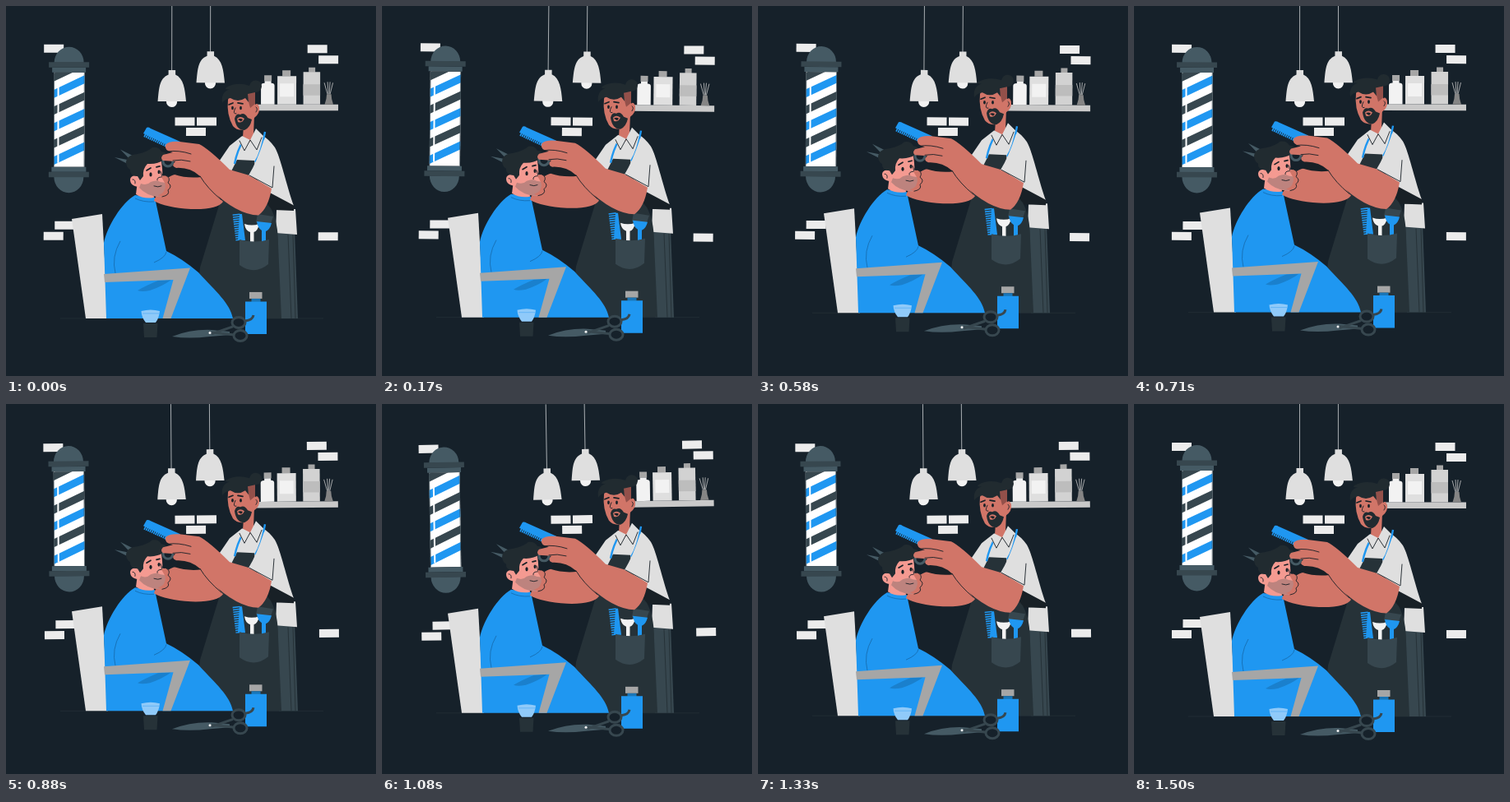
These frames come from a looping animation (450 px wide and 450 px high, 1540 ms). An HTML page:

```html
<!DOCTYPE html>
<html lang="en">
<head>
<meta charset="utf-8">
<title>Barber shop</title>
<style>
  html, body { margin: 0; width: 100%; height: 100%; overflow: hidden; background: #16212a; }
  svg { display: block; width: 100vw; height: 100vh; }
  .blue { fill: #1f97f1; }
  .skin { fill: #d17568; }
  .pink { fill: #f49a91; }
  .dark { fill: #263238; }
  .slate { fill: #37474f; }
  .steel { fill: #455a64; }
  .hair { fill: #212b30; }
  .ink { fill: #182026; }
  .light { fill: #dfdfdf; }
  .pale { fill: #f2f2f2; }
  .grey { fill: #a6a6a6; }
  .line { fill: none; stroke: #182026; stroke-width: .9; stroke-linecap: round; stroke-linejoin: round; }
  .brow { stroke-width: 1.7; }
  .fold { fill: none; stroke: #1669aa; stroke-width: .8; }
</style>
</head>
<body>
<svg viewBox="0 0 450 450">
  <defs>
    <g id="lamp">
      <path d="M201.500 0V79" stroke="#b9bdc0" stroke-width=".9"/>
      <circle class="pale" cx="201.500" cy="116.500" r="6.600"/>
      <path class="light" d="M197.500 78h8.500v5.500C216 88 217.500 101 219 116H184.500C186 101 186 88 197.500 83.500Z"/>
    </g>
    <clipPath id="tube"><path d="M58 81H95.500V196H58Z"/></clipPath>
  </defs>

  <g id="room">
    <g id="bricks" fill="#ececec"></g>
    <use href="#lamp"/>
    <use href="#lamp" x="46.900" y="-22.700"/>

    <!-- barber pole -->
    <path class="steel" d="M58.500 69a18 19 0 0 1 36 0ZM58.500 208a18 19.500 0 0 0 36 0ZM56 75H97v6H56ZM55.500 196H97.500v6H55.500Z"/>
    <path class="slate" d="M52 68.500h49v6.500H52ZM52 202h49v6.500H52Z"/>
    <g clip-path="url(#tube)">
      <path fill="#fff" d="M58 81H96V196H58Z"/>
      <g id="stripes"></g>
      <path d="M58.400 81V196M95.200 81V196" stroke="#37474f" stroke-width=".8"/>
      <path d="M63.500 97V191" stroke="#fff" stroke-width="2"/>
    </g>

    <!-- shelf -->
    <path fill="#c9c9c9" d="M304 119.500H404V127H304Z"/>
    <path class="grey" d="M314 84h9v7h-9ZM336 78h10v7h-10ZM368 74.500h8v6h-8Z"/>
    <path class="pale" d="M314.500 91h8v2.500q4 0 4 3V119.500H310V96.500q0-3 4.500-3Z"/>
    <path class="light" d="M330 85h23v34.500h-23Z"/>
    <path class="pale" d="M333 94h17v16h-17Z"/>
    <path fill="#d2d2d2" d="M361.500 80H382v39.500h-20.500Z"/>
    <path fill="#bdbdbd" d="M361.500 95H382v13.500h-20.500Z"/>
    <path d="M391 107L387 93M392 107L391 92M393 107L394 92M394 107L397.500 93" stroke="#c9c9c9" stroke-width=".8"/>
    <path fill="#858585" d="M390 107h5.500q0 6 2.500 12.500H387.500Q390 113 390 107Z"/>
  </g>

  <g id="people">
    <path d="M66 380H386" stroke="#263238" stroke-width=".7"/>

    <!-- barber: body -->
    <path class="slate" d="M328 270L351 272L355 380H332Z"/>
    <path d="M343 278L347 380M349 278L352 380" stroke="#263238" stroke-width="1"/>
    <path class="light" d="M286 159L272 170L257 192L270 204L300 240L350 243C341 218 334 184 327 172Q320 162 311 157ZM329 248L352 247L354 278L328 276Z"/>
    <path class="ink" d="M319 226L350 242.500V249L326 248L312 250Z"/>
    <path class="dark" d="M281 187L302 188Q306 230 322 246Q331 262 331 290L335 380H230L236 318L261 236L272 205Z"/>
    <path d="M278 192Q281 176 289 163M303 190Q311 178 315 153" fill="none" stroke="#1f97f1" stroke-width="2.400"/>

    <!-- barber: apron pocket -->
    <path class="slate" d="M306 253L325 256L322 265L304 263Z"/>
    <path class="blue" d="M284 253L287 253L291 285H282Z"/>
    <path d="M280 253L284 285" stroke="#1f97f1" stroke-width="9" stroke-dasharray="1.600 1.200"/>
    <path class="pale" d="M290 265Q299 268 308 265Q306 274 301.500 275V287H297V275Q291 273 290 265Z"/>
    <path class="blue" d="M305 262L323 264Q321 272 316 274V287H311V273Q306 270 305 262Z"/>
    <path class="slate" d="M284 284Q302 289 320 284L319 314Q302 328 284 315Z"/>

    <!-- barber: head -->
    <path class="skin" d="M289 145L302 132L301 157L296 166L288 160Z"/>
    <path class="skin" d="M270 114Q268 132 276 146Q282 153 292 150L302 136Q309 131 308 123Q306 117 303 120L300 104H274Z"/>
    <path fill="#93504a" d="M292 105L303 104L303 119L297 124Z"/>
    <path class="hair" d="M263 118Q261 105 272 101Q265 102 268 99Q281 92 296 97Q298 90 304 90.500Q311 91 311 98Q310 105 303 105L294 107L295 117L291 112Q282 118 273 112Q266 113 263 118Z"/>
    <path class="hair" d="M278 137Q280 130 285 132Q290 129 294 136L299 138Q297 148 290 151Q280 151 278 137Z"/>
    <path class="skin" d="M281 137Q285 133 290 137Q287 143 282 141Z"/>
    <path class="ink" d="M282 138Q285 136 288 138L286 140.500Z"/>
    <ellipse class="ink" cx="275.500" cy="124" rx="1.400" ry="2.300"/>
    <ellipse class="ink" cx="285.500" cy="124" rx="1.400" ry="2.300"/>
    <path class="line" d="M279 124Q275 132 280 131M304 123q3 2 0 6"/>
    <path class="line brow" d="M271 120L276 118M282 118L288 119"/>
    <path class="light" d="M287 158L283 164L290 177L297 163L305 175L313 158L304 149L297 163Z"/>
    <path class="line" d="M284 164L290 176L297 163L305 175L311 160"/>

    <!-- chair and cape -->
    <path class="light" d="M80 259L117 253L124 380H97Z"/>
    <path class="blue" d="M157 230C141 239 123 268 119 288L122 380H276C272 361 256 348 234 324Q214 307 195 298L181 233Z"/>
    <path fill="#1a80cd" d="M160 346Q170 340 185 334L201 333Q190 341 175 346Q165 348 160 346Z"/>
    <path class="fold" d="M195 299Q194 306 180 312M133 325Q128 305 139 286M157 234Q167 239 180 238"/>
    <path class="grey" d="M119 326L224 318.500L200.500 380H190.500L203.500 333L120 336Z"/>

    <!-- far arm -->
    <path class="skin" d="M194 212Q203 200 236 205L264 238Q257 248 225 247Q194 245 180 237Q181 230 192 226Z"/>
    <path class="ink" d="M204 193Q221 192 238 208Q220 210 205 205Q212 202 204 193Z"/>

    <!-- client -->
    <path class="steel" d="M132 184L158 189V195L150 193ZM139 174.500L160 185L152 188Z"/>
    <path class="pink" d="M160 213L158 229Q167 235 180 233L178 215Z"/>
    <path class="pink" d="M161 193L188 184Q191 200 190 206Q196 208 194 213L194 222Q196 231 188 232Q172 232 164 220Q151 220 151 211Q152 205 160 207Z"/>
    <path fill="#bd837e" d="M164 216Q171 219 176 214Q183 211 188 214L194 215V222Q196 232 186 232Q171 231 162 221Z"/>
    <path class="hair" d="M146 191Q146 181 160 180Q173 177 178 172Q186 171 189 177Q199 178 192 187Q184 193 172 192Q166 198 167 207L163 212L160 207Q150 206 151 199Q147 197 146 191Z"/>
    <ellipse class="ink" cx="176" cy="205" rx="1.600" ry="2.600"/>
    <ellipse class="ink" cx="186" cy="202" rx="1.500" ry="2.400"/>
    <path class="line brow" d="M171 200L176 197M183 196L187 195"/>
    <path class="line" d="M188 201L190 208Q183 208 184 212M180 219Q185 221 189 219M154 211q4 0 3 5"/>
    <path class="skin" d="M189 208Q195 204 199 210Q200 214 197 215Q202 219 197 224Q200 230 190 232L185 230Q192 228 193 223Q195 219 193 215Z"/>
    <path class="line" d="M194 206Q201 209 197 215Q203 219 197 224Q200 230 190 232"/>

    <!-- comb, held scissors and near arm -->
    <path class="blue" d="M171 148Q173 147 176 149L212 165L207 174L167 155Z"/>
    <path d="M169 155.500L207 173" stroke="#1f97f1" stroke-width="8" stroke-dasharray="1.700 .8"/>
    <circle cx="197" cy="189" r="6" fill="none" stroke="#455a64" stroke-width="3"/>
    <path class="skin" d="M194 169Q198 164 211 165L235 168Q247 174 272 199L296 206L323 222Q319 246 307 254.500Q281 254 249 223L236 207Q224 196 207 197Q200 194 206 189L191 188Q187 185 191 181L203 178Q192 176 194 169Z"/>
    <path class="line" d="M196 177Q210 175 225 180M203 188Q213 186 224 189M236 207Q245 222 262 236"/>
    <path class="light" d="M314 162Q332 175 333 192L326 222L295 206Q305 190 314 162Z"/>
    <path class="line" d="M296 206L324 221L326 195"/>

    <!-- front items -->
    <path fill="#90caf9" d="M164.500 371Q176 368 187 371Q186 380 182 385H170Q165 379 164.500 371Z"/>
    <path d="M166 374H186" stroke="#64b5f6" stroke-width="1"/>
    <path class="dark" d="M167 386H184.500L183.500 403H168Z"/>
    <path class="grey" d="M296 348h15.500v8H296Z"/>
    <path fill="#1976b8" d="M298.500 356h11v4h-11Z"/>
    <path class="blue" d="M291 359.500h26V399h-26Z"/>
    <path class="steel" d="M202 402Q225 393 250 394L272 396V400L248 402Q222 405 202 402Z"/>
    <g fill="none" stroke="#37474f" stroke-width="3">
      <path d="M250 399L276 390M250 397L278 400M291 383Q300 382 301 376"/>
      <ellipse cx="283" cy="385" rx="8" ry="6.500"/>
      <ellipse cx="285" cy="401" rx="8" ry="6.500"/>
    </g>
    <circle class="pale" cx="248" cy="397.500" r="1.500"/>
  </g>
</svg>
<script>
  const LOOP = 1540, PHASE = 43, RISE = 7.4;
  const get = id => document.getElementById(id);

  const bricks = [[46, 47], [59.5, 262], [46, 275], [366.5, 47], [380, 60], [380, 275],
                  [205.5, 135.5], [232, 135.5], [219, 148]];
  get('bricks').innerHTML = bricks
    .map(([x, y]) => `<rect x="${x}" y="${y}" width="24" height="10"/>`).join('');

  get('stripes').innerHTML = Array.from({ length: 6 }, (_, i) =>
    `<path class="${i % 2 ? 'blue' : 'slate'}" d="M58 ${82 + i * 20.3}l38-18v10l-38 18Z"/>`).join('');

  // Triangle wave: 0, 1, 0, -1 at the quarters of the loop.
  const sway = p => p < .25 ? 4 * p : p < .75 ? 2 - 4 * p : 4 * p - 4;

  function draw(now) {
    const p = (now + PHASE) % LOOP / LOOP;
    const lift = RISE * (1 - Math.cos(2 * Math.PI * p)) / 2;
    get('room').setAttribute('transform', `rotate(${sway(p)} 225 142.5)`);
    get('people').setAttribute('transform', `translate(0 ${-lift})`);
  }

  const start = performance.now();
  function tick() {
    draw(performance.now() - start);
    requestAnimationFrame(tick);
  }
  tick();
</script>
</body>
</html>
```
